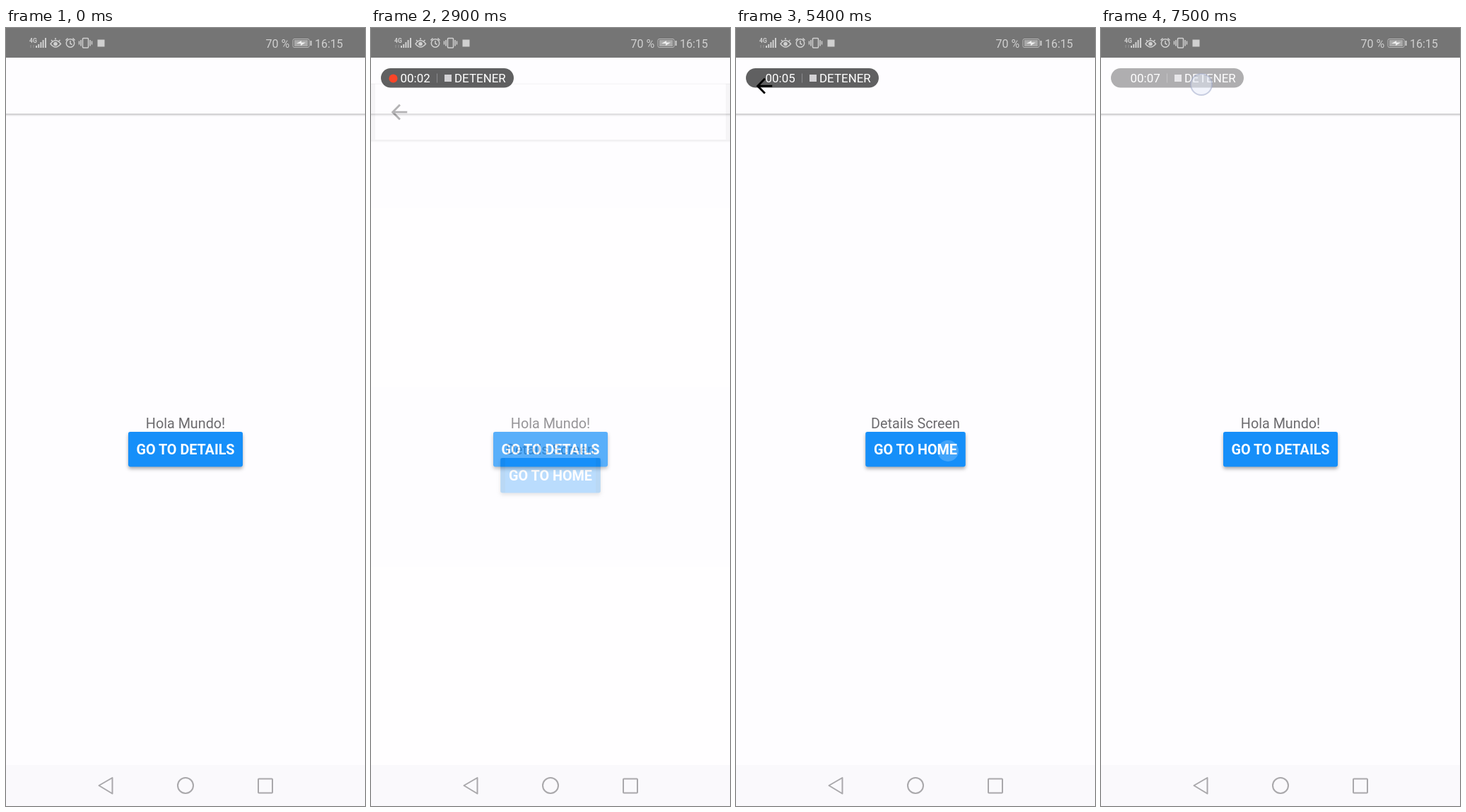
These frames come from a looping animation (508x1102 px, 7.6 s). An HTML page:

```html
<!DOCTYPE html>
<html lang="es">
<head>
<meta charset="utf-8">
<style>
  html, body { margin: 0; width: 100%; height: 100%; overflow: hidden; background: #fefdff; }
  svg { display: block; width: 508px; height: 1102px; font-family: Roboto, sans-serif; }
  .header { filter: drop-shadow(0 1.5px 1.5px rgba(0, 0, 0, .36)); }
  .button { filter: drop-shadow(0 3px 2.5px rgba(0, 0, 0, .32)); }
  .label { font-size: 19.76px; fill: #6c6b6e; text-anchor: middle; }
  .action { font-size: 19.76px; font-weight: 700; fill: #fff; text-anchor: middle; }
</style>
</head>
<body>
<svg viewBox="0 0 508 1102">
  <g id="home"></g>
  <g id="details"></g>
  <circle id="buttonTouch" cx="300" cy="599" r="15" fill="#fff" fill-opacity=".2"/>

  <g id="recorder">
    <rect x="14" y="57" width="188" height="27.5" rx="13.75" fill="#000" fill-opacity=".62"/>
    <circle id="recDot" cx="31.5" cy="71.5" r="6" fill="#fb4528"/>
    <path d="M93.5 64.5v13" stroke="#8b8a8d"/>
    <rect x="104" y="66" width="10" height="10" fill="#d2d1d4"/>
    <g font-size="16.94" fill="#fff">
      <text id="clock" x="41.5" y="77"></text>
      <text x="118" y="77">DETENER</text>
    </g>
  </g>
  <circle id="stopTouch" cx="142" cy="80" r="15" fill="#e6ebfa" fill-opacity=".5"
          stroke="#a0aac8" stroke-opacity=".55" stroke-width="2"/>

  <!-- status bar -->
  <rect width="508" height="42" fill="#757575"/>
  <g fill="#d0d0d0">
    <text x="33" y="20.5" font-size="8.5" font-weight="700">4G</text>
    <path d="M42 25h2v3h-2zM45.2 23h2v5h-2zM48.4 20h2v8h-2zM51.6 17h2v11h-2zM55 14h2v14h-2z"/>
    <path d="M35 24v4M39 24v4" stroke="#999"/>
    <circle cx="70" cy="22.5" r="2.8"/>
    <rect x="129.5" y="16.5" width="10" height="10"/>
    <rect x="408" y="17" width="19" height="9" fill="#aaa"/>
    <path d="M411 22l7-4v2.5h6l-7 4.500v-3z" fill="#eee"/>
    <g font-size="16">
      <text x="367.5" y="27.5">70 %</text>
      <text x="437" y="27.5">16:15</text>
    </g>
  </g>
  <g fill="none" stroke="#d0d0d0" stroke-width="1.5">
    <path d="M63 22.500q7-9.500 14.500 0q-7.500 9-14.500 0zM64 17l2 2M70 14v2.500M76.500 17l-2 2"/>
    <circle cx="91" cy="21.500" r="5.700"/>
    <path d="M91 18v4l2.500 1.500M84.500 17.500l3-3M97.500 17.500l-3-3"/>
    <rect x="108.500" y="14.500" width="8" height="13.500" rx="1"/>
    <path d="M106 17v8.500M119 17v8.500M103.500 18.500v5M121.500 18.500v5"/>
    <rect x="406" y="15.500" width="23" height="12" rx="2" stroke="#b8b8b8" stroke-width="1"/>
    <path d="M431.500 18v7" stroke-width="2"/>
  </g>

  <!-- navigation bar -->
  <rect y="1044" width="508" height="58" fill="#faf9fc"/>
  <g fill="none" stroke="#a9a8ab" stroke-width="2" stroke-linejoin="round">
    <path d="M131.500 1073L150.500 1062V1084.500Z"/>
    <circle cx="254" cy="1073" r="11"/>
    <rect x="357" y="1063.500" width="20" height="20" rx="1"/>
  </g>
</svg>

<script>
const LOOP = 7600, STEP = 100;
const $ = id => document.getElementById(id);
const clamp = v => Math.max(0, Math.min(1, v));
const show = (id, visible) => { $(id).style.display = visible ? '' : 'none'; };

const screen = (label, action, width, extra = '') => `
  <rect y="42" width="508" height="1002" fill="#fefdff"/>
  <rect class="header" x="-20" y="42" width="548" height="79.500" fill="#fefdff"/>
  <text class="label" x="254" y="566.500">${label}</text>
  <rect class="button" x="${254 - width / 2}" y="572" width="${width}" height="49.400" rx="2.800" fill="#168ff9"/>
  <text class="action" x="254" y="604.300">${action}</text>${extra}`;

const backArrow = `<path transform="translate(23 65.200) scale(1.411)"
  d="M20 11H7.830l5.590-5.590L12 4l-8 8 8 8 1.410-1.410L7.830 13H20v-2z"/>`;
// Elevation shadows that show through the card while it is translucent.
const seams = `<g id="seams" fill="none" stroke="#000" stroke-opacity=".1">
  <path d="M3 42V121M505 42V121" stroke-width="6"/><path d="M0 42.500H508"/>
  <path d="M186.500 572V621M321.500 572V621" stroke-width="7"/></g>`;

$('home').innerHTML = screen('Hola Mundo!', 'GO TO DETAILS', 162);
$('details').innerHTML = screen('Details Screen', 'GO TO HOME', 141.500, backArrow + seams);

// Card progress: quintic ease-out to open, linear to close.
function cardProgress(t) {
  const opening = 1 - (1 - clamp((t - 2850) / 350)) ** 5;
  return t < 5400 ? opening : 1 - clamp((t - 5400) / 150);
}

function cardOpacity(p) {
  if (p < .5) return p * .5;
  if (p < .9) return .25 + (p - .5) * 1.125;
  return .7 + (p - .9) * 3;
}

function render(t) {
  const p = cardProgress(t);
  show('details', p > 0);
  $('details').setAttribute('transform', `translate(0 ${80 * (1 - p)})`);
  $('details').setAttribute('opacity', cardOpacity(p));
  show('seams', p > 0 && p < .99);

  const elapsed = Math.max(0, t - 200);
  show('recorder', t >= 200);
  $('recorder').setAttribute('opacity', t < 300 || t >= 7500 ? .5 : 1);
  $('clock').textContent = '00:0' + Math.floor(elapsed / 1000);
  show('recDot', elapsed % 1000 >= 500);

  show('buttonTouch', (t >= 2600 && t < 2900) || (t >= 5300 && t < 5500));
  show('stopTouch', t >= 7400);
}

const start = performance.now();
function frame() {
  const t = (performance.now() - start) % LOOP;
  render(Math.floor(t / STEP) * STEP);
  requestAnimationFrame(frame);
}
frame();
</script>
</body>
</html>
```
